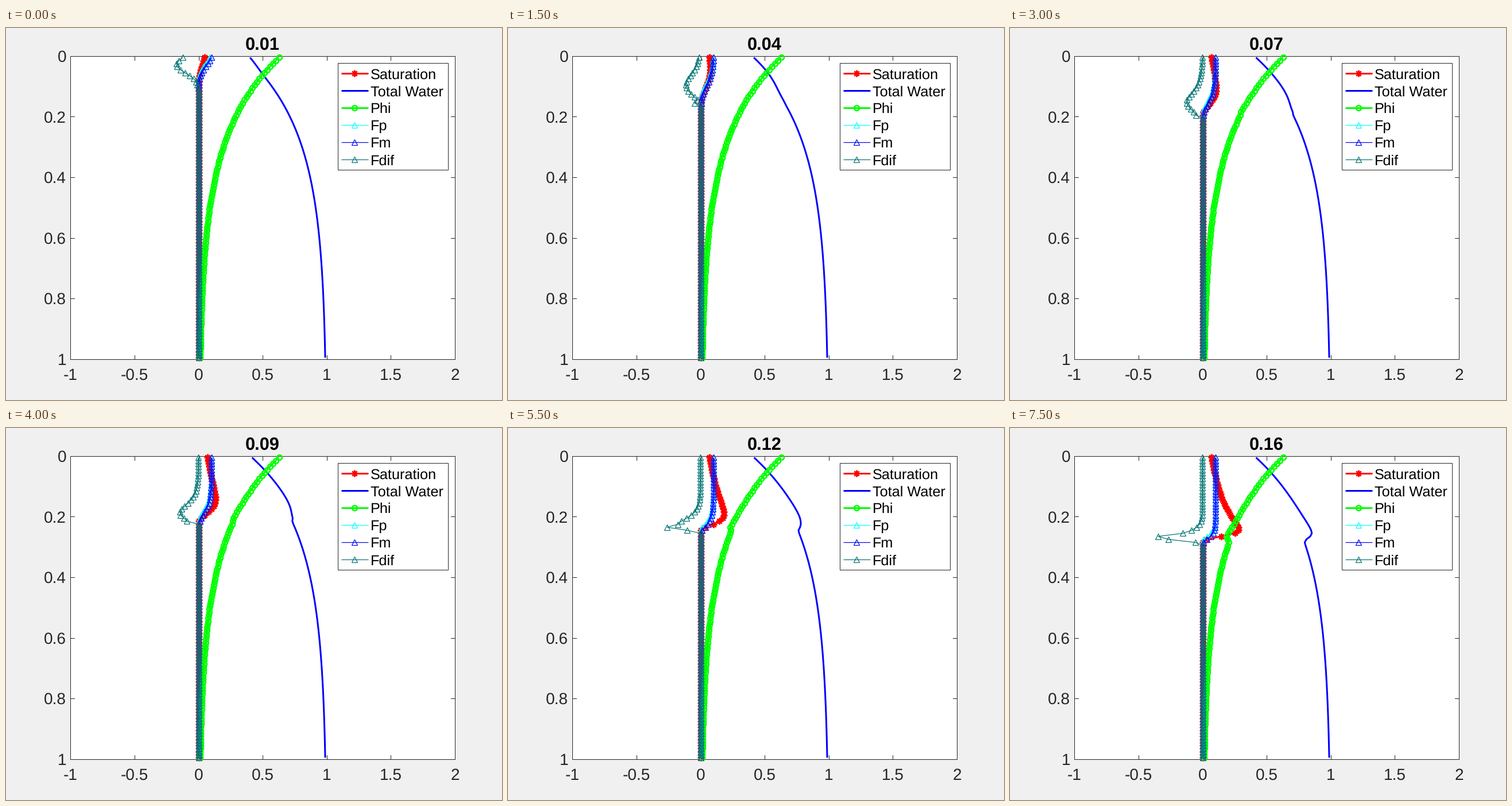
Animation of 864 by 648 pixels, one loop 8 s. Source, as a matplotlib script:

```python
import matplotlib.pyplot as plt
import numpy as np
from matplotlib.animation import FuncAnimation
from matplotlib.patches import Rectangle

W, H, DPI = 864, 648, 100
X0, Y0, XW, YH = 112.3, 48.8, 669.6, 528.1   # plot box in pixels
PX = 72 / DPI                                # points per pixel
FRAMES = 16
INK = "#262626"

plt.rcParams["font.family"] = "Liberation Sans"
plt.rcParams["text.hinting"] = "no_hinting"

# Meltwater percolating into cold porous snow
N, DZ, DT = 100, 0.01, 1e-4
INFLOW, PERM, CAPIL, SWELL = 0.101, 100, 0.23, 1.2
FREEZE_RATE = 1.3
z = (np.arange(N) + 0.5) * DZ


def fluxes(phi, sat):
    inner = phi[:-1] ** 3 * (PERM * sat[:-1] ** 2 - CAPIL * np.diff(sat) / DZ)
    return np.concatenate([[INFLOW], inner, [0]])


def simulate():
    phi = 0.64 * np.exp(-4 * z)
    water = np.zeros(N)
    cold = 26 * np.minimum(z, 0.4) ** 5      # water each cell can still freeze
    states = []
    for _ in range(FRAMES):
        for _ in range(round(0.01 / DT)):
            f = fluxes(phi, water / phi)
            water = np.maximum(water - DT * np.diff(f) / DZ, 0)
            ice = np.minimum(np.minimum(water, cold), FREEZE_RATE * DT)
            water, cold, phi = water - ice, cold - ice, phi - SWELL * ice
        sat = water / phi
        f = fluxes(phi, sat)
        total = 1 - phi + phi * sat
        states.append((sat, total, phi, f[1:], f[:-1], 10 * np.diff(f)))
    return states


states = simulate()


def px(v):
    return X0 + (np.asarray(v) + 1) / 3 * XW


def py(v):
    return Y0 + np.asarray(v) * YH


fig = plt.figure(figsize=(W / DPI, H / DPI), dpi=DPI, facecolor="#f0f0f0")
ax = fig.add_axes([0, 0, 1, 1])
ax.set_xlim(0, W)
ax.set_ylim(H, 0)
ax.axis("off")


def label(x, y, s, size, **kw):
    return ax.text(x, y, s, fontsize=size * PX, va="baseline", **kw)


def box(x, y, w, h, zorder):
    ax.add_patch(Rectangle((x, y), w, h, fc="white", ec=INK, lw=PX, zorder=zorder))


def tick(xs, ys):
    ax.plot(xs, ys, color=INK, lw=PX, zorder=1)


box(X0, Y0, XW, YH, 0)
right, bottom, size = X0 + XW, Y0 + YH, 6.7
for v in np.arange(-1, 2.1, 0.5):
    x = float(px(v))
    tick([x, x], [bottom, bottom - size])
    tick([x, x], [Y0, Y0 + size])
    label(x, 613, f"{v:g}", 28, ha="center", color=INK)
for v in np.arange(6) / 5:
    y = float(py(v))
    tick([X0, X0 + size], [y, y])
    tick([right, right - size], [y, y])
    label(105, y + 9.8, f"{v:g}", 28, ha="right", color=INK)

title = label(447, 38, "", 30.8, ha="center", color="black", weight="bold")

# name, colour, line width, marker, marker size, marker edge
SERIES = [
    ("Saturation", "#ff0000", 3, (8, 2, 0), 11.5, 2.3),
    ("Total Water", "#0000ff", 3, None, 0, 0),
    ("Phi", "#00ff00", 3, "o", 8.8, 2.6),
    ("Fp", "#00ffff", 1.2, "^", 10, 1.2),
    ("Fm", "#0000ff", 1.2, "^", 10, 1.2),
    ("Fdif", "#007373", 1.2, "^", 10, 1.2),
]


def styled(xs, ys, spec, zorder, **kw):
    _, color, lw, marker, ms, edge = spec
    return ax.plot(xs, ys, color=color, lw=lw * PX, marker=marker, ms=ms * PX,
                   mfc="none", mec=color, mew=edge * PX, zorder=zorder,
                   solid_capstyle="butt", **kw)[0]


lines = [styled([], [], spec, 2 + i) for i, spec in enumerate(SERIES)]

box(578, 61, 192, 186, 10)
for i, spec in enumerate(SERIES):
    y = 79.3 + 30 * i
    styled([584, 607, 631], [y] * 3, spec, 11, markevery=[1])
    label(635, y + 9, spec[0], 25.2, color="black", zorder=11)


def update(i):
    title.set_text(f"{(i + 1) / 100:g}")
    for line, values in zip(lines, states[i]):
        line.set_data(px(values), py(z))
    return [title, *lines]


anim = FuncAnimation(fig, update, frames=FRAMES, interval=500,
                     repeat=True, repeat_delay=0)
plt.show()
```
